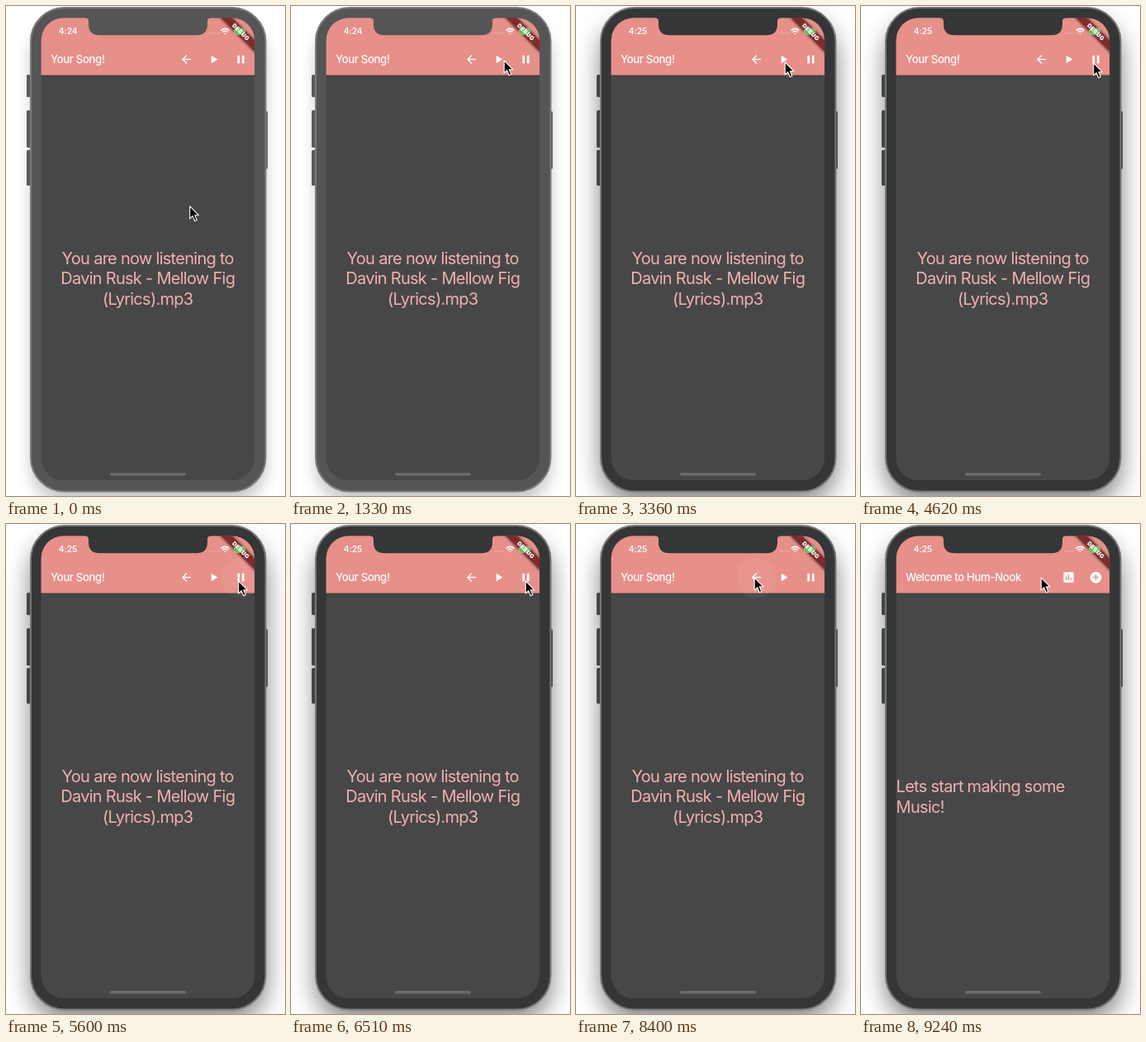
Write an HTML page that moves like this. It is 338 by 592 pixels and loops after 9310 ms.

```html
<!DOCTYPE html>
<html lang="en">
<head>
<meta charset="utf-8">
<title>Music player</title>
<style>
  html, body { margin: 0; width: 100%; height: 100%; overflow: hidden; background: #fff; }
  svg { display: block; width: 338px; height: 592px; }
  text { font-family: Inter, "Open Sans", sans-serif; fill: #fff; }
  .title { font-size: 13.2px; font-weight: 550; letter-spacing: -.36px; }
  .body { font-size: 20px; letter-spacing: -.72px; fill: #f2b0ae; }
  .center { text-anchor: middle; }
  .clock { font-size: 10.2px; font-weight: 600; letter-spacing: -.1px; }
  .debug { font-size: 7.1px; font-weight: 900; letter-spacing: .3px; }
  .phone { --bezel: #555; --rim: #7b7b7b; --button: #5a5a5a; }
  .phone.active { --bezel: #343637; --rim: #747777; --button: #434546; }
  .bezel { fill: var(--bezel); }
  .rim { fill: var(--bezel); stroke: var(--rim); stroke-width: 2; }
  .buttons { fill: var(--button); }
  .shade { fill: #000; opacity: .22; filter: url(#soft); }
  .active .shade { opacity: .5; filter: url(#wide); }
  .icon { fill: #fff; }
</style>
</head>
<body>
<svg viewBox="0 0 338 592">
  <defs>
    <clipPath id="screen"><rect x="42.700" y="14.400" width="258.400" height="558.600" rx="27"/></clipPath>
    <filter id="soft" x="-30%" y="-20%" width="160%" height="140%"><feGaussianBlur stdDeviation="9"/></filter>
    <filter id="wide" x="-30%" y="-20%" width="160%" height="140%"><feGaussianBlur stdDeviation="15"/></filter>
    <filter id="blur" x="-50%" y="-100%" width="200%" height="300%"><feGaussianBlur stdDeviation="1.8"/></filter>
    <linearGradient id="drop" x2="0" y2="1">
      <stop stop-color="#000" stop-opacity=".15"/><stop offset="1" stop-color="#000" stop-opacity="0"/>
    </linearGradient>
    <g id="scaffold">
      <rect x="42" y="14" width="260" height="560" fill="#474747"/>
      <rect x="42" y="83.500" width="260" height="3" fill="url(#drop)"/>
      <rect x="42" y="14" width="260" height="69.500" fill="#e78f89"/>
    </g>
  </defs>

  <g class="phone" id="phone">
    <rect class="shade" x="30" y="20" width="285" height="580" rx="42"/>
    <g class="buttons">
      <rect x="25" y="83" width="7" height="27" rx="1.5"/>
      <rect x="25" y="126" width="7" height="45" rx="1.5"/>
      <rect x="25" y="174" width="7" height="43" rx="1.5"/>
      <rect x="311" y="127" width="6" height="70" rx="1.5"/>
    </g>
    <rect class="rim" x="30" y="2" width="284.5" height="584.5" rx="41"/>

    <g clip-path="url(#screen)">
      <g id="home">
        <use href="#scaffold"/>
        <text class="title" x="54" y="69.3">Welcome to Hum-Nook</text>
        <text class="body" x="42.600" y="324">Lets start making some</text>
        <text class="body" x="42.600" y="348.7">Music!</text>
        <g id="homeIcons"></g>
      </g>
      <g id="player">
        <rect x="36" y="14" width="6" height="560" fill="#000" opacity=".12"/>
        <use href="#scaffold"/>
        <circle id="splash" cy="65" fill="#fff"/>
        <text class="title" x="54" y="69.3">Your Song!</text>
        <text class="body center" x="171.700" y="311.6">You are now listening to</text>
        <text class="body center" x="171.700" y="336.2">Davin Rusk - Mellow Fig</text>
        <text class="body center" x="171.700" y="360.8">(Lyrics).mp3</text>
        <g id="playerIcons"></g>
      </g>

      <g fill="#fff" opacity=".45">
        <circle cx="247" cy="33" r=".8"/><circle cx="250.5" cy="33" r=".8"/>
        <circle cx="254" cy="33" r=".8"/><circle cx="257.5" cy="33" r=".8"/>
      </g>
      <g transform="translate(301 15) rotate(45)">
        <rect x="-32" y="18.5" width="64" height="10" opacity=".75" filter="url(#blur)"/>
        <rect x="-30" y="19.3" width="60" height="8.3" fill="#822a2b"/>
      </g>
      <rect x="276.5" y="27" width="13" height="7.5" rx="2" fill="#5fbf58" stroke="#fff" stroke-opacity=".4" stroke-width=".7"/>
      <text class="debug center" transform="translate(301 15) rotate(45)" y="25.800">DEBUG</text>
      <g fill="none" stroke="#fff" stroke-width="1.5">
        <path d="M260.7 29.6q4.8-4.4 9.6 0M262.5 31.6q3-2.6 6 0"/>
        <path d="M264 32.8h3l-1.5 1.6z" fill="#fff" stroke="none"/>
      </g>
      <text class="clock" id="clock" x="63.8" y="34.4"></text>
      <rect x="126" y="564" width="92" height="3.4" rx="1.7" fill="#6b6b6b"/>
    </g>
    <path class="bezel" d="M96 13H248V14.400Q244 14.400 244 18.500V22Q244 35.300 230.500 35.300H113.500Q100 35.300 100 22V18.500Q100 14.400 96 14.400Z"/>
  </g>

  <g id="ring" fill="none">
    <circle r="20" stroke="#fff" stroke-opacity=".85" stroke-width="4.8"/>
    <circle r="20" stroke="#000" stroke-width="2.8"/>
  </g>
  <path id="cursor" d="M.7.8V15.900L4.200 12.700 6.700 18.700 9.300 17.600 6.800 11.800H11.500Z" stroke="#fff" stroke-width="1.1" stroke-linejoin="round"/>
</svg>
<script>
const LOOP = 9310, STEP = 70;
const ACTIVE_AT = 1750;
const POP = { at: 8400, length: 420, width: 258 };

const icons = {
  back: "M20 11H7.830l5.590-5.590L12 4l-8 8 8 8 1.410-1.410L7.830 13H20z",
  play: "M8 5v14l11-7z",
  pause: "M6 5h4v14H6zM14 5h4v14h-4z",
  chart: "M5 3H19a2 2 0 0 1 2 2V19a2 2 0 0 1-2 2H5a2 2 0 0 1-2-2V5a2 2 0 0 1 2-2zM7 10v7h2v-7zM11 7v10h2V7zM15 13v4h2v-4z",
  add: "M12 2a10 10 0 0 0 0 20 10 10 0 0 0 0-20zM11 7h2v4h4v2h-4v4h-2v-4H7v-2h4z"
};
const slots = { back: 218.5, play: 251.5, chart: 251.5, pause: 284.5, add: 284.5 };

// time, x, y of the pointer tip
const pointer = [
  [0, 222, 241], [350, 222, 241], [1260, 257.5, 65], [1400, 257.5, 65], [1680, 252.5, 67],
  [3850, 252.5, 67], [4550, 281, 68], [6370, 281, 68], [6510, 283.5, 68],
  [7070, 283.5, 68], [7980, 215.5, 64], [8890, 215.5, 64], [9240, 217.5, 64]
];
const clicks = [
  { at: 1890, up: 2170, x: slots.play },
  { at: 5320, up: 5600, x: slots.pause },
  { at: 8120, up: 8330, x: slots.back }
];

const $ = id => document.getElementById(id);
const clamp = v => Math.min(1, Math.max(0, v));
const smooth = p => p * p * (3 - 2 * p);
const easeOut = p => 1 - (1 - p) ** 3;
const move = (el, x, y = 0) => el.setAttribute("transform", `translate(${x} ${y})`);

function addIcons(id, names) {
  $(id).innerHTML = names.map(name =>
    `<path class="icon" fill-rule="evenodd" d="${icons[name]}" transform="translate(${slots[name] - 8.25} 56.300) scale(.688)"/>`
  ).join("");
}

function pointerAt(t) {
  const next = pointer.findIndex(k => k[0] > t);
  if (next < 0) return pointer.at(-1).slice(1);
  const [t0, x0, y0] = pointer[next - 1], [t1, x1, y1] = pointer[next];
  const p = smooth((t - t0) / (t1 - t0));
  return [x0 + (x1 - x0) * p, y0 + (y1 - y0) * p];
}

function draw(t) {
  const [x, y] = pointerAt(t);
  move($("cursor"), x, y);

  const active = t >= ACTIVE_AT;
  $("phone").classList.toggle("active", active);
  $("clock").textContent = active ? "4:25" : "4:24";

  const click = clicks.findLast(c => t >= c.at);
  $("ring").style.display = click && t < click.up ? "" : "none";
  move($("ring"), x + 1.5, y + 3);

  const splash = $("splash");
  if (click) {
    const fade = 1 - clamp((t - click.up - 70) / 280);
    splash.setAttribute("cx", click.x);
    splash.setAttribute("r", 24 * easeOut(clamp((t - click.at) / 280)));
    splash.setAttribute("opacity", .05 * fade);
  } else {
    splash.setAttribute("opacity", 0);
  }

  const slide = easeOut(clamp((t - POP.at) / POP.length));
  move($("player"), slide * (POP.width + 8));
  move($("home"), (slide - 1) * POP.width / 3);
}

addIcons("homeIcons", ["chart", "add"]);
addIcons("playerIcons", ["back", "play", "pause"]);

const start = performance.now();
function tick() {
  const t = (performance.now() - start) % LOOP;
  draw(Math.floor(t / STEP) * STEP);
  requestAnimationFrame(tick);
}
tick();
</script>
</body>
</html>
```
